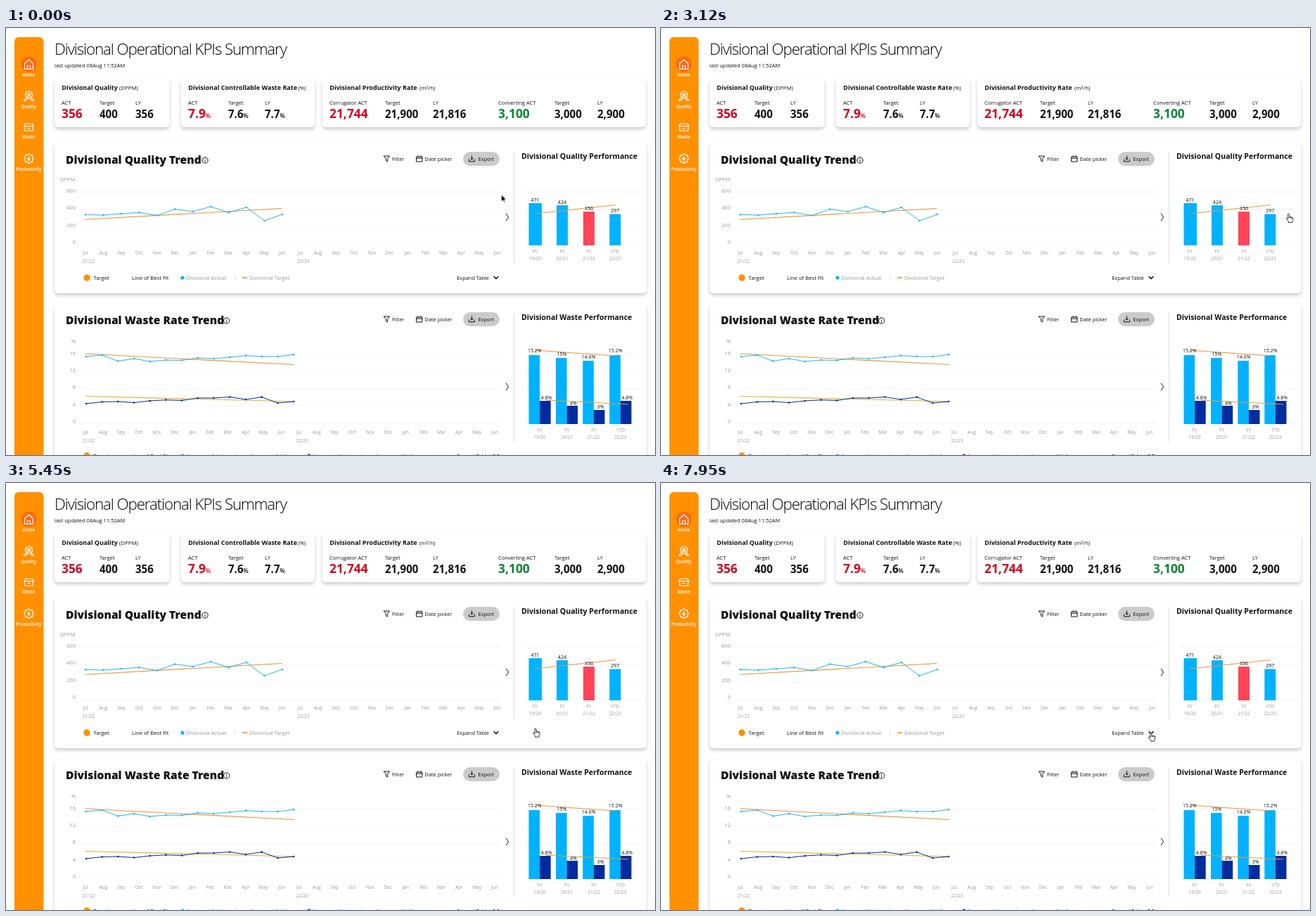
An HTML page for the animation above (8610 ms loop, 923 by 607 pixels).

```html
<!DOCTYPE html>
<html lang="en">
<head>
<meta charset="utf-8">
<title>KPI dashboard</title>
<style>
  html, body { margin: 0; width: 100%; height: 100%; overflow: hidden; background: #fff; }
  svg { display: block; }
  text { font-family: "Open Sans", "Noto Sans", sans-serif; fill: #111; white-space: pre; }
  .heavy { font-weight: 800; }
  .bold { font-weight: 700; }
  .semi { font-weight: 600; }
  .title { font-weight: 300; letter-spacing: -.05em; fill: #000; }
  .light { font-family: Lato, "Open Sans", sans-serif; font-weight: 300; }
  .plain { font-family: Lato, "Open Sans", sans-serif; font-weight: 400; }
  .gray { fill: #999; }
  .white { fill: #fff; }
  .red { fill: #d5001c; }
  .green { fill: #078533; }
  .mid { text-anchor: middle; }
  .end { text-anchor: end; }
  .card { fill: #fff; filter: drop-shadow(0 3px 2.5px #0003); }
  .icon { fill: none; stroke: #111; stroke-width: 1; stroke-linejoin: round; stroke-linecap: round; }
  .side { stroke: #fff; stroke-width: 1.2; }
  .thick { stroke-width: 1.6; }
</style>
</head>
<body>
<svg width="923" height="607" viewBox="0 0 923 607"></svg>
<script>
const CYAN = '#00b2ff', NAVY = '#002c9f', ORANGE = '#e8933a', RED = '#ff4558';
const MONTHS = ['Jul', 'Aug', 'Sep', 'Oct', 'Nov', 'Dec', 'Jan', 'Feb', 'Mar', 'Apr', 'May', 'Jun'];
const YEARS = [['FY', '19/20'], ['FY', '20/21'], ['FY', '21/22'], ['YTD', '22/23']];

const text = (x, y, str, size = 7.4, cls = '') =>
  `<text x="${x}" y="${y}" font-size="${size}" class="${cls}">${str}</text>`;
const rect = (x, y, w, h, fill, extra = '') =>
  `<rect x="${x}" y="${y}" width="${w}" height="${h}" fill="${fill}" ${extra}/>`;
const dot = (x, y, r, fill) => `<circle cx="${x}" cy="${y}" r="${r}" fill="${fill}"/>`;
const line = (points, color, width = 1) =>
  `<polyline points="${points.join(' ')}" fill="none" stroke="${color}" stroke-width="${width}"/>`;
const icon = (x, y, d, cls = '') =>
  `<path class="icon ${cls}" transform="translate(${x} ${y})" d="${d}"/>`;
const card = (x, y, w, h) => rect(x, y, w, h, '#fff', 'rx="5" class="card"');
const grid = (x1, x2, ys) => ys.map(y => line([x1, y, x2, y], '#f3f3f3')).join('');

// Evenly spaced data line with dots
function series(x, step, ys, color) {
  const points = ys.map((y, i) => [x + i * step, y]);
  return line(points, color) + points.map(([px, py]) => dot(px, py, 1.35, color)).join('');
}

function monthAxis(step, y) {
  let out = '';
  for (let i = 0; i < 24; i++) out += text(113 + i * step, y, MONTHS[i % 12], 6.5, 'gray mid');
  return out + text(117.5, y + 12, '21/22', 6.5, 'gray mid')
    + text(117.5 + 12 * step, y + 12, '22/23', 6.5, 'gray mid');
}

const yearLabel = (x, y, i) =>
  text(x, y, YEARS[i][0], 6.5, 'gray mid') + text(x, y + 9.5, YEARS[i][1], 6.5, 'gray mid');

const info = (x, y) => icon(x, y, 'M-4.2 0a4.2 4.2 0 1 0 8.4 0a4.2 4.2 0 1 0-8.4 0M0-.4V2M0-2V-1.9');

const toolbar = (dx, y) => `<g transform="translate(${dx} ${y})">`
  + icon(541.5, 0, 'M-4-4H4L1.2-.3V4L-1.2 2.6V-.3z') + text(549, 3, 'Filter')
  + icon(588, 0, 'M-4-3H4V4H-4zM-4-.8H4M-2-4.5V-3M2-4.5V-3') + text(595.5, 3, 'Date picker')
  + rect(650, -10, 52, 20, '#cbcbcb', 'rx="10"')
  + icon(662.5, 0, 'M0-4.2V1M-2-1L0 1L2-1M-4 1V3.8H4V1') + text(671.5, 3, 'Export') + '</g>';

function legend(y, items) {
  return dot(115, y, 4.7, '#ff9000') + text(124.5, y + 3, 'Target', 7.7)
    + text(179, y + 3, 'Line of Best Fit', 7.7)
    + items.map(([x, label, color, dash]) => text(x, y + 3, label, 7.5, 'gray')
      + (dash ? line([x - 10, y, x - 3, y], color, 1.6) + line([x - 20, y - 4, x - 20, y + 4], '#ddd')
        : dot(x - 5, y, 2.6, color))).join('');
}

const tableToggle = (x, y, open) => text(x, y + 3, open ? 'Hide Table' : 'Expand Table', 7.4, 'end')
  + icon(x + 10, y, open ? 'M-3 1.5L0-1.5L3 1.5' : 'M-3-1.5L0 1.5L3-1.5', 'thick');

function sidebar() {
  const label = (y, str) => text(32.3, y, str, 6.2, 'semi white mid');
  let teeth = '';
  for (let i = 0; i < 8; i++) {
    const c = Math.cos(i * Math.PI / 4), s = Math.sin(i * Math.PI / 4);
    teeth += `M${c * 6} ${s * 6}L${c * 7.2} ${s * 7.2}`;
  }
  return rect(12, 13, 41.5, 620, '#ff9000', 'rx="6"') + dot(32.5, 51.5, 11, '#ff6a13')
    + icon(32.5, 52, 'M-6-1.5L0-7L6-1.5V6.5H-6zM-2 6.5V1.5H2V6.5', 'side') + label(69, 'Home')
    + icon(32.5, 95, 'M-5 0a5 5 0 1 0 10 0a5 5 0 1 0-10 0M0-2.6L.8-.8L2.6-.6L1.3.6L1.6 2.4L0 1.5L-1.6 2.4L-1.3.6L-2.6-.6L-.8-.8zM-4 4L-7 8.5L-3.6 8L-2 5M4 4L7 8.5L3.6 8L2 5', 'side')
    + label(114, 'Quality')
    + icon(32.5, 141, 'M-5-5H5L7-1.5H-7zM-6-1.5V5H6V-1.5M-2 1.5H2', 'side') + label(156.5, 'Waste')
    + icon(32.5, 185.5, 'M-6 0a6 6 0 1 0 12 0a6 6 0 1 0-12 0M.8-3L-2 .6H2L-.8 3' + teeth, 'side')
    + label(203, 'Productivity');
}

// Each figure: x, label, value, optional colour class
function kpiCard(x, w, title, unitX, unit, figures) {
  return card(x, 72, w, 69) + text(x + 10.3, 88, title, 9, 'bold') + text(unitX, 88, unit, 7.8)
    + figures.map(([fx, label, value, color]) => text(fx, 109, label, 7.5)
      + text(fx, 128, value.replace('%', '<tspan font-size="8.5" font-weight="600">%</tspan>'),
        color ? 17.4 : 15.1, 'bold ' + (color || ''))).join('');
}

const header = () => text(69, 38, 'Divisional Operational KPIs Summary', 22.4, 'title')
  + text(69, 56, 'last updated 08Aug 11:52AM', 7.5)
  + kpiCard(69, 163.5, 'Divisional Quality', 161, '(DPPM)',
    [[79, 'ACT', '356', 'red'], [133, 'Target', '400'], [184, 'LY', '356']])
  + kpiCard(249, 190, 'Divisional Controllable Waste Rate', 415.5, '(%)',
    [[259, 'ACT', '7.9%', 'red'], [316, 'Target', '7.6%'], [368, 'LY', '7.7%']])
  + kpiCard(450, 460, 'Divisional Productivity Rate', 588, '(m²/h)',
    [[460, 'Corrugator ACT', '21,744', 'red'], [539, 'Target', '21,900'], [607, 'LY', '21,816'],
     [700, 'Converting ACT', '3,100', 'green'], [780, 'Target', '3,000'], [841, 'LY', '2,900']]);

function qualityBars() {
  const bars = [[743.5, 249, 471], [783, 252, 424], [821, 261, 356], [858.3, 264.5, 297]];
  return line([722.5, 176, 722.5, 335], '#ddd') + icon(713, 269, 'M-1.8-5L1.6 0L-1.8 5')
    + text(733, 186, 'Divisional Quality Performance', 10.6, 'bold')
    + grid(738, 905, [233, 258, 283, 308])
    + bars.map(([x, y, v], i) => rect(x, y, i ? 16 : 18.5, 309 - y, i == 2 ? RED : CYAN)
      + yearLabel(x + (i ? 8 : 9), 320, i)).join('')
    + line([752, 264, 867, 251.5], ORANGE)
    + bars.map(([x, y, v], i) => text(x + (i ? 8 : 9), y - 2.5, v, 7.2, 'mid')).join('');
}

function qualityCard(wide, open) {
  const dx = wide ? 192.3 : 0, step = wide ? 33.2 : 25.45;
  return card(69, 163, 841.5, open ? 480 : 214)
    + text(85, 193, 'Divisional Quality Trend', 15.6, 'heavy') + info(283, 188) + toolbar(dx, 186)
    + text(77, 218, 'DPPM', 7.6, 'gray') + grid(105, 703 + dx, [233, 258, 283, 308])
    + [600, 400, 200, 0].map((v, i) => text(99, 233.7 + i * 24.5, v, 7.6, 'gray end')).join('')
    + monthAxis(step, 322)
    + line(wide ? [113, 260.5, 478, 269] : [112, 272.3, 392, 256.5], ORANGE, 1.1)
    + series(113, step, [265.3, 266, 264, 262.3, 266.5, 257.5, 261, 254, 262.3, 255, 274, 265], '#22b5ee')
    + legend(355, [[256, 'Divisional Actual', CYAN], [346, 'Divisional Target', '#ff9000', true]])
    + tableToggle(687 + dx, 355, open)
    + (wide ? icon(899, 270, 'M1.6-4L-1.4 0L1.6 4') : qualityBars());
}

function wasteCard() {
  const bars = [[743.5, 465, '15.2%', 530, '4.8%'], [782, 469, '15%', 537, '4%'],
    [820.3, 473, '14.6%', 543, '3%'], [858.3, 465, '15.2%', 530, '4.8%']];
  return card(69, 392, 841.5, 260)
    + text(85, 421, 'Divisional Waste Rate Trend', 15.6, 'heavy') + info(313.7, 416) + toolbar(0, 414)
    + text(99, 448, '%', 7.4, 'gray end') + grid(105, 703, [463, 488, 513, 537, 562])
    + [16, 12, 8, 4, 0].map((v, i) => text(99, 464.5 + i * 24.4, v, 7.6, 'gray end')).join('')
    + monthAxis(25.3, 577)
    + line([113, 463, 410, 478.5], ORANGE, 1.1) + line([113, 523.5, 410, 531], '#e0ae35', 1.1)
    + series(114, 22.7, [467, 465, 473.5, 470, 474, 472, 472.5, 469, 470, 468, 465.7, 467, 467, 464.3], '#22b5ee')
    + series(114, 22.7, [534, 531.5, 531, 532.5, 530, 528.7, 529.5, 526, 526, 524.5, 528, 524.7, 533, 531], NAVY)
    + legend(608, [[256, 'Divisional RW Actual', CYAN], [347, 'Divisional RW Target', '#ff9000', true],
      [436, 'Divisional TW Actual', NAVY], [526, 'Divisional TW Target', '#e0ae35', true]])
    + tableToggle(687, 608)
    + line([722.5, 405, 722.5, 588], '#ddd') + icon(713, 510, 'M-1.8-5L1.6 0L-1.8 5')
    + text(733, 414.5, 'Divisional Waste Performance', 10.5, 'bold')
    + grid(738, 905, [463, 488, 513, 537, 562])
    + bars.map(([x, y, , y2], i) => rect(x, y, 15.6, 563 - y, CYAN)
      + rect(x + 15.6, y2, 15.6, 563 - y2, NAVY) + yearLabel(x + 15.6, 574, i)).join('')
    + line([752, 458, 866, 466], ORANGE) + line([768, 529, 885, 535], '#e0a03a')
    + bars.map(([x, y, v, y2, v2], i) => text(x + 8.3, y - (i % 3 ? 2.8 : 4.3), v, 7, 'mid')
      + text(x + 25, y2 - (i == 1 ? .8 : 2.3), v2, 7, 'mid')).join('');
}

function popup() {
  const figures = [[550.5, 'Actual', 471], [611, 'Target', 450], [672, 'Last Year', 462]];
  const bars = [[591, 310.5, 300, '#e2006f', 'East'], [628.5, 300.5, 390, '#9436ff', 'North'],
    [666, 300.5, 390, '#007f75', 'South']];
  return '<path class="card" d="M542 126H732Q734 126 734 128V241L739.5 248L734 255V369Q734 371 732 371H542Q540 371 540 369V128Q540 126 542 126z"/>'
    + text(550.5, 150, 'FY 19/20', 14.4, 'plain')
    + figures.map(([x, label, v]) => text(x, 174.5, label, 10, 'bold')
      + text(x, 197, v, 15.6, 'light') + text(x, 210, 'DPPM', 7.2)).join('')
    + text(550.5, 237, 'Dreakdown', 14.3, 'plain') + text(550.5, 257, 'DPPM', 7.4, 'gray')
    + grid(578, 728, [271, 296, 321, 347])
    + [600, 400, 200, 0].map((v, i) => text(572, 272.5 + i * 24.4, v, 7.4, 'gray end')).join('')
    + bars.map(([x, y, , fill, name]) => rect(x, y, 18, 348 - y, fill)
      + text(x + 9, 358.5, name, 6.5, 'gray mid')).join('')
    + line([600, 321, 637.5, 283.5, 675, 288], ORANGE)
    + [[600, 321], [637.5, 283.5], [675, 288]].map(([x, y]) => dot(x, y, 1.3, ORANGE)).join('')
    + bars.map(([x, y, v]) => text(x + 9, y - 2, v, 7.2, 'mid')).join('');
}

function table() {
  const columns = [[269.5, 'ACT', 92], [318, 'Target', 254], [366, 'LY May 21', 288], [415, 'LY FY', 288],
    [470, 'Vs Target', '-64%'], [518, 'Vs LY May 21', '-68%'], [573, 'Vs LY FY', '-68%'],
    [639, 'ACT', 200], [687, 'Target', 254], [735.5, 'LY', 269], [800, 'Vs Target', '-21%'], [848, 'Vs LY', '-25%']];
  const names = ['Poland and Baltics', 'South-East Europe', 'Region', 'Benelux', 'DCH', 'Nordic\'s', 'UK', 'Region'];
  const pitch = 25.75;
  let out = rect(85, 416, 809, 3 * pitch, '#efefef')
    + rect(454, 416, 164.5, 200, '#c9f2d7') + rect(785, 416, 109, 200, '#c9f2d7');
  names.forEach((name, row) => {
    const top = 416 + row * pitch, base = top + 16.8, bad = row == 1 || row == 6;
    const weight = name == 'Region' ? 'bold ' : '';
    if (bad) out += rect(454, top, 107, pitch, '#ffccd0');
    if (row) out += line([row == 3 ? 85 : 155.5, top, 894, top], '#0001');
    out += text(166, base, name, 7.7, weight);
    columns.forEach(([x, , value], c) => {
      const color = !`${value}`.includes('%') ? '' : bad && c < 6 ? 'red' : 'green';
      out += text(x, base, value, 7.7, weight + color);
    });
  });
  out += [155.5, 250, 618.5].map(x => line([x, 416, x, 607], '#0002')).join('')
    + text(95, 458.5, 'East Europe', 7.7) + text(95, 562, 'North Europe', 7.7)
    + rect(85, 372, 809, 44, '#595959')
    + [155.5, 250, 618.5].map(x => line([x, 372, x, 416], '#ccc')).join('') + line([250, 394, 894, 394], '#ccc')
    + text(95, 398, 'Region', 10.3, 'bold white') + text(166, 398, 'Sub-region', 10.3, 'bold white')
    + text(442, 387.5, 'June 2022', 10.3, 'bold white mid') + text(766, 387.5, '2022', 10.3, 'bold white mid');
  return out + columns.map(([x, label]) => text(x, 407.5, label, 7.2, 'bold white')).join('');
}

const group = (id, body) => `<g id="${id}">${body}</g>`;
document.querySelector('svg').innerHTML = sidebar() + header()
  + group('waste', wasteCard()) + group('normal', qualityCard())
  + group('wide', qualityCard(true)) + group('table', qualityCard(false, true) + table())
  + group('popup', popup())
  + group('cursor',
    '<path id="arrow" d="M0 0V9.6L2.3 7.5L3.8 10.8L5.3 10.1L3.9 7H6.8z" fill="#000" stroke="#fff" stroke-width=".7"/>'
    + '<path id="hand" d="M-1 .8Q-1-.4 0-.4Q1-.4 1.1 .8L1.4 4Q2.4 3.4 3 4.3Q4 3.7 4.6 4.7Q6.3 4.3 6.4 6Q6.5 8.6 5.2 10V12H-.2V10.4L-3 7Q-3.6 5.7-2.4 5.6L-.6 7zM1.4 4V6M3 4.5V6.2M4.6 4.8V6.4" fill="#fff" stroke="#111" stroke-width=".85" stroke-linejoin="round"/>');

const LOOP = 8610;
// start, end, step count, target x, target y
const moves = [[320, 720, 6, 711, 266], [1690, 2330, 9, 897.5, 264], [3120, 3760, 9, 752.5, 277],
  [4500, 4900, 6, 754.5, 349], [5450, 6160, 10, 696.5, 355]];
const el = id => document.getElementById(id);
const between = (t, a, b) => t >= a && t < b;
const ease = p => p * p * (3 - 2 * p);

function draw(t) {
  let x = 704.5, y = 237;
  for (const [start, end, steps, tx, ty] of moves) {
    if (t < start) break;
    const step = Math.floor((t - start) / ((end - start) / (steps - 1)) + 1e-6) + 1;
    const p = ease(Math.min(1, step / steps));
    x += (tx - x) * p;
    y += (ty - y) * p;
  }
  const hand = t >= 720;
  el('cursor').setAttribute('transform', `translate(${x} ${y})`);
  el('hand').style.opacity = +hand;
  el('arrow').style.opacity = +!hand;

  const wide = between(t, 1030, 2560) ? 1 : between(t, 950, 2640) ? .5 : 0;
  const open = between(t, 6390, 7950);
  el('wide').style.opacity = wide;
  el('popup').style.opacity = between(t, 3920, 5130) ? 1 : between(t, 5130, 5210) ? .5 : 0;
  el('table').style.opacity = +open;
  el('waste').style.opacity = +!open;
  el('normal').style.opacity = open || wide == 1 ? 0 : 1;
}

function tick() {
  draw(performance.now() % LOOP);
  requestAnimationFrame(tick);
}
tick();
</script>
</body>
</html>
```
